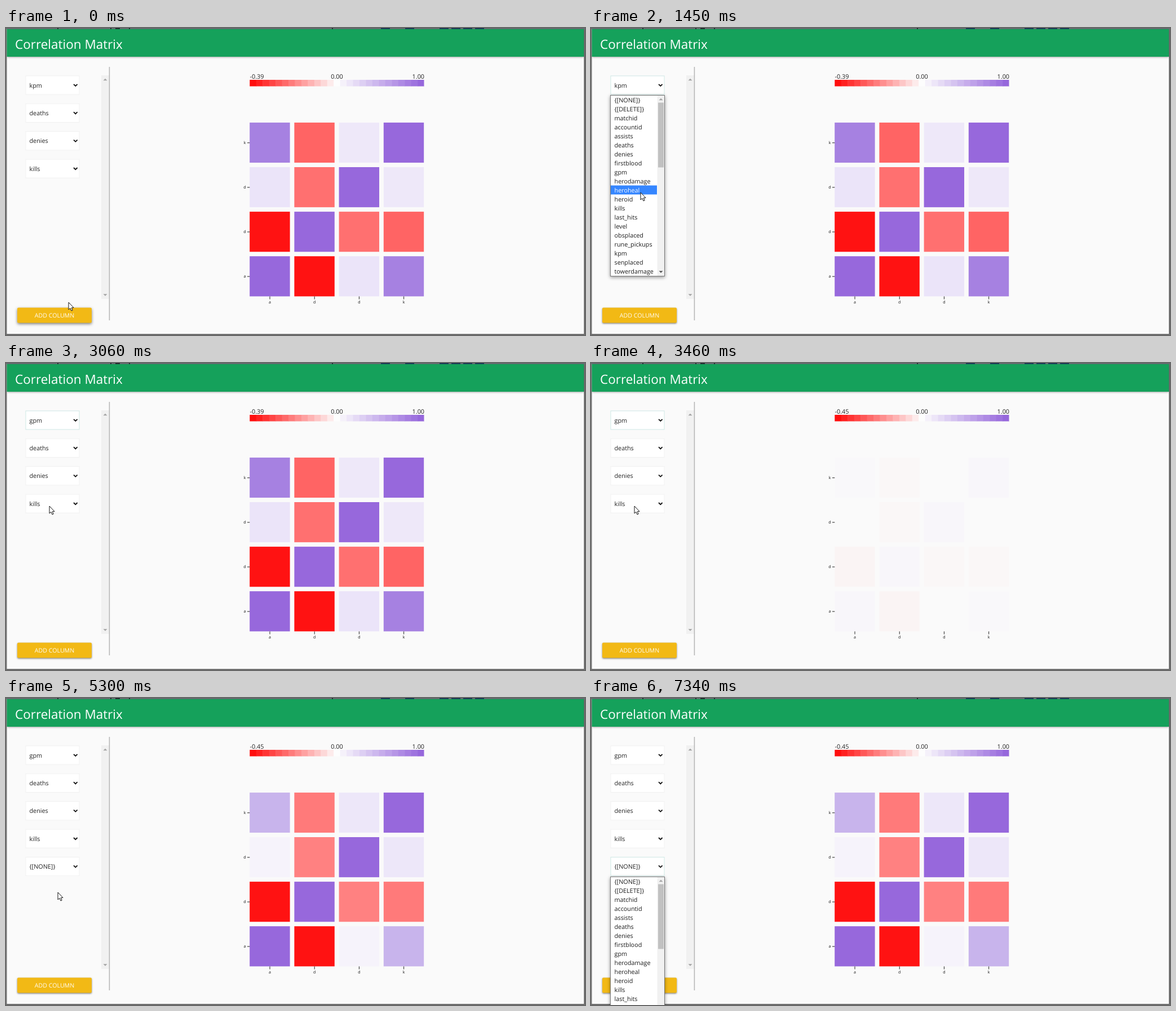
An HTML page with a canvas that plays this animation: 1027x545 px, repeating every 8000 ms.

```html
<!DOCTYPE html>
<html lang="en">
<head>
<meta charset="utf-8">
<title>Correlation Matrix</title>
<style>
  html, body { margin: 0; width: 100%; height: 100%; overflow: hidden; background: #fafafa; }
  canvas { display: block; width: 1027px; height: 545px; }
</style>
</head>
<body>
<canvas id="stage" width="1027" height="545"></canvas>
<script>
const ctx = document.getElementById('stage').getContext('2d');
const LOOP = 8000, W = 1027, H = 545;
const FONT = '"Open Sans", "Noto Sans", sans-serif';
const RED = '#ff1212', PURPLE = '#9768dc';
const OPTIONS = ('{[NONE]} {[DELETE]} matchid accountid assists deaths denies firstblood gpm herodamage ' +
  'heroheal heroid kills last_hits level obsplaced rune_pickups kpm senplaced towerdamage').split(' ');

// Pointer steps: time, x, y, click ring radius
const STEPS = [
  [0, 111, 487], [200, 112, 400], [400, 108, 230], [600, 100, 114], [820, 95, 97, 14],
  [1020, 95, 98], [1220, 92, 192], [1450, 88, 292], [1650, 85, 298], [1850, 82, 304],
  [2040, 79, 309], [2240, 78, 311, 9], [2440, 77, 255], [2640, 77, 254, 9],
  [2840, 77, 254, 6], [3040, 77, 254], [3860, 84, 315], [4060, 108, 440],
  [4260, 118, 507, 9], [4480, 118, 507], [5100, 112, 440], [5300, 92, 345],
  [5500, 84, 302, 9], [5700, 82, 303], [5900, 68, 420], [6100, 62, 467],
  [6320, 64, 492], [6520, 66, 515], [7120, 68, 532], [7340, 70, 570]
];

// Upper triangles: ad, an, ak, dn, dk, nk
const BEFORE = [RED, '#ebe4f9', '#a681e1', '#ff7070', '#ff6464', '#eee8f9'];
const AFTER = [RED, '#f6f3fb', '#c8b4ec', '#ff8181', '#ff7a7a', '#ede7f9'];

function rect(x, y, w, h, color) {
  ctx.fillStyle = color;
  ctx.fillRect(x, y, w, h);
}

function text(str, x, y, size, color = '#222', align = 'left', weight = 400) {
  ctx.font = `${weight} ${size}px ${FONT}`;
  ctx.textAlign = align;
  ctx.fillStyle = color;
  ctx.fillText(str, x, y);
}

function poly(points, color) {
  ctx.beginPath();
  points.forEach(([x, y]) => ctx.lineTo(x, y));
  ctx.closePath();
  ctx.fillStyle = color;
  ctx.fill();
}

function triangle(x, y, dir, color) {
  poly([[x - 3.5, y + 1.8 * dir], [x + 3.5, y + 1.8 * dir], [x, y - 1.8 * dir]], color);
}

function shadowed(blur, dy, color, draw) {
  ctx.save();
  ctx.shadowBlur = blur;
  ctx.shadowOffsetY = dy;
  ctx.shadowColor = color;
  draw();
  ctx.restore();
}

function mix(from, to, k) {
  return `rgb(${from.map((c, i) => Math.round(c + (to[i] - c) * k))})`;
}

function drawWindow() {
  rect(0, 0, W, H, '#707070');
  rect(1.5, 2, 1023.5, 541, '#fafafa');
  rect(0, 0, W, 2, '#667073');
  for (const x of [665, 708, 769, 790, 811, 832]) rect(x, 0, 16, 2, '#1b3a57');
  for (const x of [91, 185, 194, 218, 578]) rect(x, 0, x === 194 ? 8 : 2, 2, '#252b30');
  shadowed(3, 1, 'rgba(0,0,0,.35)', () => rect(1.5, 2, 1023.5, 49, '#15a15b'));
  text('Correlation Matrix', 16, 36.5, 22.5, '#fff');
}

function drawPanel() {
  rect(169, 84, 14, 397, '#f1f1f1');
  triangle(176, 91.5, 1, '#a3a3a3');
  triangle(176, 474, -1, '#a3a3a3');
  rect(182.7, 69, 1.5, 450, '#b4b4b4');
}

function drawSelect(index, label, focused) {
  const y = 85 + index * 49.4;
  rect(34.5, y - .5, 96, 34, focused ? '#cfe8e5' : '#f1f1f1');
  rect(35.5, y + .5, 94, 32, '#fff');
  text(label, 41.5, y + 20.5, 10.8);
  ctx.beginPath();
  ctx.moveTo(120, y + 14.8);
  ctx.lineTo(123.3, y + 18);
  ctx.lineTo(126.6, y + 14.8);
  ctx.strokeStyle = '#111';
  ctx.lineWidth = 1.8;
  ctx.stroke();
}

function drawButton(t) {
  const raised = t < 200 || (t >= 4260 && t < 5100);
  shadowed(raised ? 5 : 3, raised ? 2 : 1.2, 'rgba(0,0,0,.5)', () => {
    ctx.beginPath();
    ctx.roundRect(20, 496.5, 132, 27, 2);
    ctx.fillStyle = '#f2b915';
    ctx.fill();
  });
  if (t >= 4260 && t < 4880) {
    const radius = t < 4480 ? 18 : t < 4680 ? 55 : 110;
    ctx.save();
    ctx.beginPath();
    ctx.roundRect(20, 496.5, 132, 27, 2);
    ctx.clip();
    ctx.beginPath();
    ctx.arc(118, 507, radius, 0, 7);
    ctx.fillStyle = `rgba(255,255,255,${t < 4680 ? .2 : .1})`;
    ctx.fill();
    ctx.restore();
  }
  text('ADD COLUMN', 86, 514, 10.6, '#fffdf5', 'center', 500);
}

function drawLegend(low) {
  const bins = 27, size = 309.2 / bins;
  for (let i = 0; i < bins; i++) {
    const v = i / (bins - 1) * 2 - 1;
    const end = v < 0 ? [255, 14, 14] : [150, 103, 220];
    rect(432.3 + i * size, 92, size + .5, 11.5, mix([253, 253, 253], end, Math.abs(v)));
  }
  rect(741.5, 92, 1, 11.5, '#fafafa');
  text(low, 432.5, 90, 10.8);
  text('0.00', 587, 90, 10.8, '#222', 'center');
  text('1.00', 742, 90, 10.8, '#222', 'right');
}

function drawMatrix(colors, alpha) {
  const pitch = 79.2, size = 71.4;
  const pairs = { '01': 0, '02': 1, '03': 2, '12': 3, '13': 4, '23': 5 };
  for (let row = 0; row < 4; row++) {
    const y = 405.2 - row * 79.1;
    ctx.globalAlpha = alpha;
    for (let col = 0; col < 4; col++) {
      const key = `${Math.min(row, col)}${Math.max(row, col)}`;
      rect(432.2 + col * pitch, y, size, 71.2, row === col ? PURPLE : colors[pairs[key]]);
    }
    ctx.globalAlpha = 1;
    const name = 'addk'[row], x = 468 + row * pitch;
    rect(428, y + 35.4, 4.3, 1, '#222');
    text(name, 425.5, y + 38.2, 7, '#111', 'right');
    rect(x - .5, 476.5, 1, 5, '#222');
    text(name, x, 488.5, 7, '#111', 'center');
  }
}

function drawList(top, pointerY, selected) {
  shadowed(6, 2, 'rgba(0,0,0,.4)', () => rect(34, top - 1, 97, 322, '#777'));
  rect(35, top, 95, 320, '#fff');
  const hovered = pointerY < top ? selected : Math.floor((pointerY - top) / 16);
  OPTIONS.forEach((name, i) => {
    const y = top + i * 16;
    if (i === hovered) rect(35, y - .5, 82, 16, '#3586ff');
    text(name, 41.5, y + 11.5, 10.8, i === hovered ? '#fff' : '#1c1c1c');
  });
  rect(117.5, top, 12.5, 320, '#f1f1f1');
  rect(119, top + 12.5, 10, 115, '#c1c1c1');
  triangle(124, top + 6.5, 1, '#a3a3a3');
  triangle(124, top + 313, -1, '#505050');
}

function drawArrow() {
  ctx.beginPath();
  for (const [x, y] of [[0, 0], [0, 13], [3, 10.4], [5, 15], [7.2, 14], [5.2, 9.8], [9, 9.5]]) ctx.lineTo(x, y);
  ctx.closePath();
}

function drawHand() {
  ctx.beginPath();
  ctx.moveTo(-1.5, 10);
  ctx.lineTo(-1.5, 0);
  ctx.quadraticCurveTo(0, -3.5, 1.4, 0);
  ctx.lineTo(1.4, 4.5);
  ctx.quadraticCurveTo(3, 3.5, 4, 5.2);
  ctx.quadraticCurveTo(6, 4.5, 6.4, 6.2);
  ctx.quadraticCurveTo(8, 6, 8, 8);
  ctx.lineTo(7.5, 11.5);
  ctx.lineTo(6, 15);
  ctx.lineTo(-.2, 15);
  ctx.lineTo(-4.8, 8.5);
  ctx.quadraticCurveTo(-4.5, 6.5, -1.5, 9.5);
  ctx.closePath();
}

function drawPointer(x, y, ring, hand) {
  if (ring) {
    ctx.beginPath();
    ctx.arc(x, y, ring, 0, 7);
    ctx.fillStyle = 'rgba(236,226,50,.6)';
    ctx.fill();
  }
  ctx.save();
  ctx.translate(x, y);
  (hand ? drawHand : drawArrow)();
  ctx.fillStyle = '#fff';
  ctx.fill();
  ctx.strokeStyle = '#111';
  ctx.lineWidth = 1;
  ctx.stroke();
  ctx.restore();
}

function render(t) {
  const [, x, y, ring] = STEPS.findLast(step => step[0] <= t);
  const updated = t >= 3260;
  const alpha = t >= 3260 && t < 3460 ? 0 : t >= 3460 && t < 3660 ? .025 : 1;
  const labels = [t < 2840 ? 'kpm' : 'gpm', 'deaths', 'denies', 'kills'];
  if (t >= 4480) labels.push('{[NONE]}');
  const focus = t >= 820 && t < 4260 ? 0 : t >= 5500 ? 4 : -1;

  drawWindow();
  drawPanel();
  labels.forEach((label, i) => drawSelect(i, label, i === focus));
  drawButton(t);
  drawLegend(updated ? '-0.45' : '-0.39');
  drawMatrix(updated ? AFTER : BEFORE, alpha);
  if (t >= 1020 && t < 2840) drawList(120, y, 17);
  if (t >= 5700) drawList(318, y < H ? y : Infinity, 0);
  drawPointer(x, y, ring, t >= 4260 && t < 5100);
}

ctx.textRendering = 'geometricPrecision';
const start = performance.now();
function tick() {
  render((performance.now() - start) % LOOP);
  requestAnimationFrame(tick);
}
tick();
</script>
</body>
</html>
```
